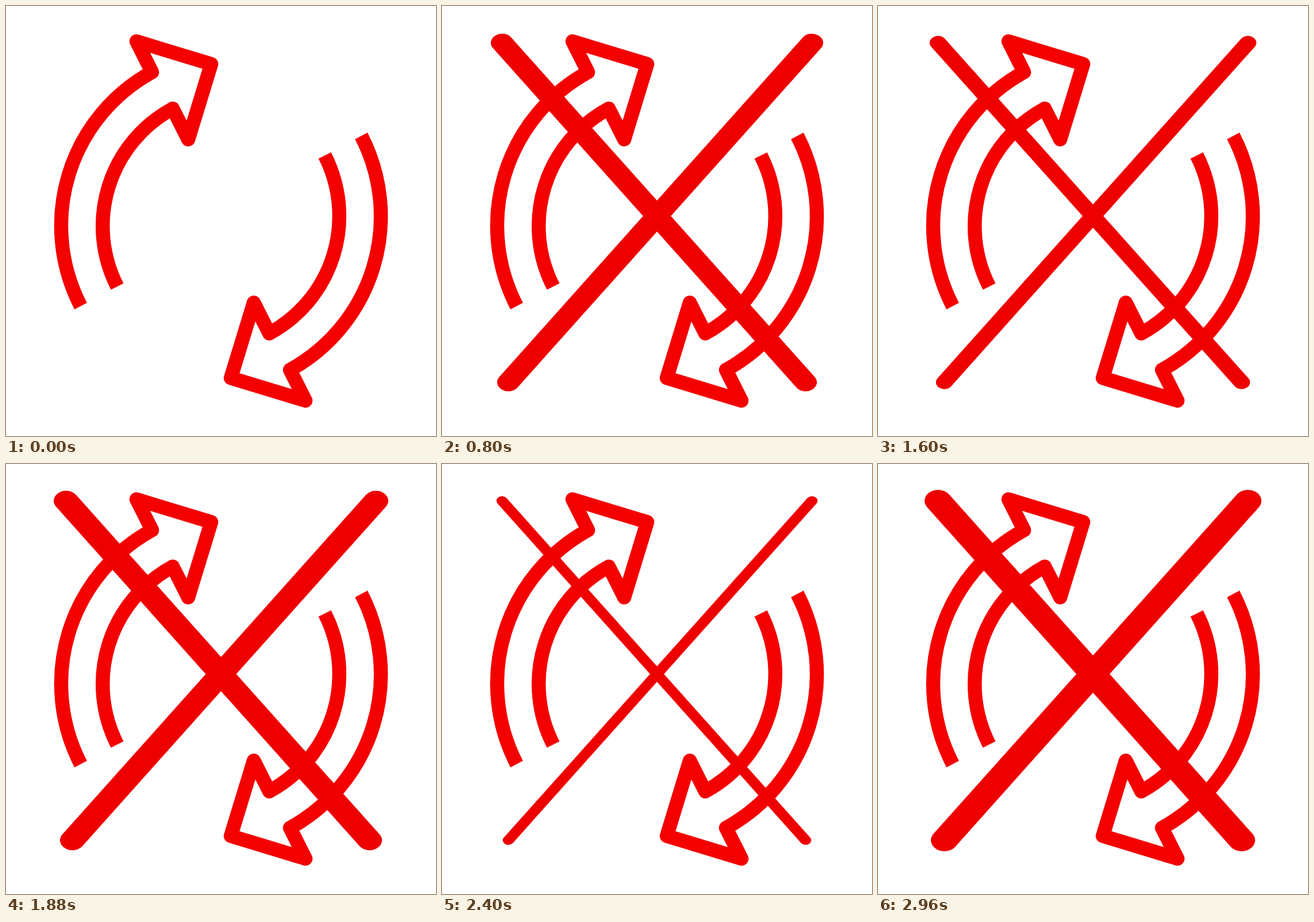
Animation, 748 px wide and 748 px high, one loop 3000 ms. Source, as an HTML page:

```html
<!DOCTYPE html>
<html lang="en">
<head>
<meta charset="utf-8">
<title>No refresh</title>
<style>
  html, body { margin: 0; width: 100%; height: 100%; overflow: hidden; background: #fff; }
  svg { display: block; width: 100vw; height: 100vh; }
</style>
</head>
<body>
<svg viewBox="0 0 748 748">
  <defs>
    <path id="arrow" d="M130 522A304.6 304.6 0 0 1 254 115L227 61.5L357 101L317 232L290 178.5A232 232 0 0 0 193.5 488"/>
  </defs>
  <g fill="none" stroke="#f50000" stroke-width="24.5" stroke-linejoin="round">
    <use href="#arrow"/>
    <use href="#arrow" transform="rotate(180 374 374)"/>
  </g>
  <!-- Wider than tall, so the stroke caps become ellipses -->
  <g id="cross" transform="translate(374 0) scale(1.235 1)" stroke="#ee0000" stroke-linecap="round"></g>
</svg>
<script>
  const STEP = 40, STEPS = 25, STRETCH = 1.235, MAX_WIDTH = 38;
  const cross = document.getElementById('cross');

  for (const side of [-1, 1]) {
    const line = document.createElementNS('http://www.w3.org/2000/svg', 'line');
    const ends = { x1: side * 269.5 / STRETCH, y1: 64, x2: -side * 258.5 / STRETCH, y2: 654.5 };
    for (const key in ends) line.setAttribute(key, ends[key]);
    cross.append(line);
  }

  // The cross thickens from nothing once per second, then vanishes.
  function draw(time) {
    const step = Math.floor(time / STEP) % STEPS;
    cross.setAttribute('stroke-width', MAX_WIDTH * step / (STEPS - 1));
  }

  function tick() {
    draw(performance.now());
    requestAnimationFrame(tick);
  }
  tick();
</script>
</body>
</html>
```
